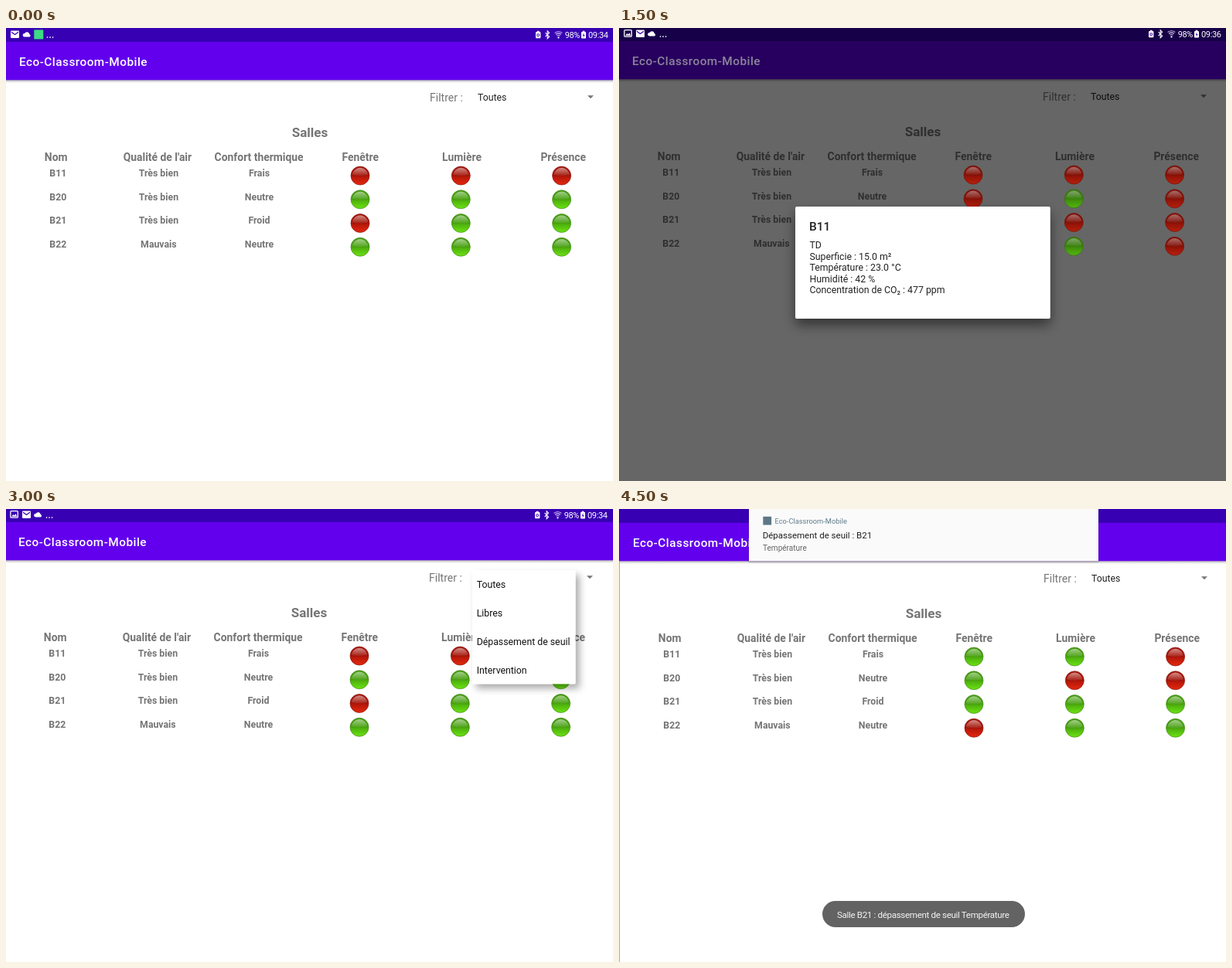
Recreate the animation shown at these times as an HTML page. Size 785 by 586 pixels, loop 6 s.

```html
<!DOCTYPE html>
<html lang="fr">
<head>
<meta charset="utf-8">
<title>Eco-Classroom-Mobile</title>
<style>
html, body { margin: 0; width: 100%; height: 100%; overflow: hidden; background: #fff; }
svg { display: block; width: 785px; height: 586px; }
text { font-family: Roboto, "Noto Sans", sans-serif; white-space: pre; }
</style>
</head>
<body>
<svg id="stage" viewBox="0 0 785 586" xmlns="http://www.w3.org/2000/svg">
  <defs>
    <linearGradient id="R" x2="0" y2="1">
      <stop offset="0" stop-color="#a5160c"/><stop offset=".48" stop-color="#a31307"/>
      <stop offset=".6" stop-color="#bb190a"/><stop offset="1" stop-color="#e4280f"/>
    </linearGradient>
    <linearGradient id="G" x2="0" y2="1">
      <stop offset="0" stop-color="#469c12"/><stop offset=".48" stop-color="#459f0c"/>
      <stop offset=".6" stop-color="#51b60d"/><stop offset="1" stop-color="#6be314"/>
    </linearGradient>
    <linearGradient id="gloss" x2="0" y2="1">
      <stop offset="0" stop-color="#fff" stop-opacity=".5"/>
      <stop offset="1" stop-color="#fff" stop-opacity=".06"/>
    </linearGradient>
    <linearGradient id="fade" x2="0" y2="1">
      <stop offset="0" stop-opacity=".3"/><stop offset="1" stop-opacity="0"/>
    </linearGradient>
    <filter id="deep" x="-20%" y="-30%" width="140%" height="170%">
      <feDropShadow dx="0" dy="8" stdDeviation="8" flood-opacity=".5"/>
    </filter>
    <filter id="side" x="-20%" y="-20%" width="150%" height="150%">
      <feDropShadow dx="5" dy="6" stdDeviation="5" flood-opacity=".33"/>
    </filter>
    <filter id="soft" x="-5%" y="-20%" width="110%" height="150%">
      <feDropShadow dx="0" dy="1" stdDeviation="1" flood-opacity=".4"/>
    </filter>
  </defs>
</svg>
<script>
const STEP = 1500;
const GREY = "#757575";
const stage = document.getElementById("stage");

const rect = (x, y, w, h, fill, extra = "") =>
  `<rect x="${x}" y="${y}" width="${w}" height="${h}" fill="${fill}" ${extra}/>`;
const text = (s, x, y, size, fill, { weight = 400, anchor = "start", gap = 0 } = {}) =>
  `<text x="${x}" y="${y}" font-size="${size}" fill="${fill}" font-weight="${weight}" ` +
  `text-anchor="${anchor}" letter-spacing="${gap}">${s}</text>`;
const at = (x, y, body) => `<g transform="translate(${x} ${y})">${body}</g>`;
const bold = (s, x, y, size) => text(s, x, y, size, GREY, { weight: 700, anchor: "middle" });

// Status bar icons, each drawn from its own left edge
const icons = {
  mail: rect(0, 3.6, 11, 9.4, "#fff", 'rx="1"') +
    '<path d="M1 5.2l4.5 3.3L10 5.2" fill="none" stroke="#3700b3" stroke-width="1.3"/>',
  cloud: '<path d="M2.3 11.5a2.3 2.3 0 0 1 .3-4.6a3.4 3.4 0 0 1 6.2 1a1.9 1.9 0 0 1 0 3.6z" fill="#fff"/>',
  image: rect(0.6, 3.6, 9.4, 8.6, "none", 'rx="1" stroke="#fff" stroke-width="1.3"') +
    '<path d="M2 10.8l2-2.8 1.5 1.6 1.6-2.4 2 3.6z" fill="#fff"/>',
  square: rect(0, 2.4, 12, 12, "#3ddc84"),
};

function statusRight(time) {
  const small = { gap: -0.35 };
  const wifi = [3, 5, 7].map(r =>
    `<path d="M${714.5 - r * 0.7} ${13 - r * 0.95}q${r * 0.7} ${-r * 0.45} ${r * 1.4} 0"/>`).join("");
  return rect(685, 5, 6.4, 8.3, "#fff", 'rx="1"') + rect(686.8, 3.8, 2.8, 1.5, "#fff") +
    '<circle cx="688.2" cy="9.2" r="1.5" fill="none" stroke="#3700b3"/>' +
    '<path d="M697.6 6.2l5 5-2.4 2.4V3.9l2.4 2.3-5 5" fill="none" stroke="#fff" stroke-width="1.1"/>' +
    `<g fill="none" stroke="#d8ccf2" stroke-width="1.1">${wifi}</g>` +
    '<circle cx="714.5" cy="12.4" r="1.1" fill="#fff"/>' +
    text("98%", 722.7, 13, 11, "#fff", { gap: -0.4 }) +
    rect(744, 5, 6, 8.6, "#fff", 'rx=".8"') + rect(745.7, 3.7, 2.6, 1.5, "#fff") +
    '<path d="M747.6 6.3l-2 3.4h1.5l-.5 2.7 2-3.5h-1.4z" fill="#3700b3"/>' +
    text(time, 753, 13, 11, "#fff", small);
}

function status(left, time) {
  const dots = [53.5, 57, 60.5].map(x => rect(x - 0.7, 11.3, 1.5, 1.5, "#fff")).join("");
  return left.map(([name, x]) => at(x, 0, icons[name])).join("") + dots + statusRight(time);
}

const ball = (kind, x, y) => at(x, y,
  `<circle r="12" fill="url(#${kind})" stroke="${kind === "R" ? "#8c1a12" : "#478a1c"}" stroke-width=".7"/>` +
  '<path d="M-10.3 -1.2A10.4 10.4 0 0 1 10.3 -1.2Q0 1.2 -10.3 -1.2z" fill="url(#gloss)"/>');

const columns = ["Nom", "Qualité de l'air", "Confort thermique", "Fenêtre", "Lumière", "Présence"];
const rooms = [
  ["B11", "Très bien", "Frais"],
  ["B20", "Très bien", "Neutre"],
  ["B21", "Très bien", "Froid"],
  ["B22", "Mauvais", "Neutre"],
];
const rowY = i => i * 30.75;

const balls = lights => lights.split(" ").map((row, i) =>
  [...row].map((kind, j) => ball(kind, 458 + j * 130.3, 191 + rowY(i))).join("")).join("");

const title = fill => text("Eco-Classroom-Mobile", 17, 49, 15.4, fill, { weight: 500, gap: 0.46 });

const base = rect(-5, -5, 800, 600, "#fff") +
  rect(-5, 67, 800, 4, "url(#fade)") +
  rect(-5, 18, 800, 49.3, "#6200ee") +
  rect(-5, -5, 800, 23, "#3700b3") +
  text("Filtrer :", 548, 94.8, 14, GREY) +
  text("Toutes", 610, 94, 12.3, "#212121") +
  '<path d="M752 87.3h8l-4 4z" fill="#757575"/>' +
  bold("Salles", 393, 140.6, 17) +
  columns.map((s, i) => bold(s, 64.7 + i * 131.2, 172, 13.9)).join("") +
  rooms.map((room, i) => room.map((s, j) =>
    bold(s, 67.3 + j * 130.1, 191.9 + rowY(i), 12.3)).join("")).join("");

const screen = lights => base + title("#fff") + balls(lights);

const dimmed = lights => base + rect(-5, -5, 800, 600, "#000", 'opacity=".6"') +
  title("#8d859a") + `<g style="filter:brightness(.8)">${balls(lights)}</g>`;

const dialog = rect(228, 231, 329.7, 145, "#fff", 'rx="2" filter="url(#deep)"') +
  text("B11", 246, 261.6, 15.4, "#212121", { weight: 500 }) +
  ["TD", "Superficie : 15.0 m²", "Température : 23.0 °C", "Humidité : 42 %",
    "Concentration de CO₂ : 477 ppm"]
    .map((s, i) => text(s, 246.5, 285.2 + i * 14.55, 12.3, "#222")).join("");

const menu = rect(603, 79, 133.5, 147.3, "#fff", 'rx="1.5" filter="url(#side)"') +
  ["Toutes", "Libres", "Dépassement de seuil", "Intervention"]
    .map((s, i) => text(s, 608.7, 102 + i * 36.9, 12.3, "#111")).join("");

const alerts = rect(0, 68, 1, 518, "#aaa") +
  rect(168, -4, 452, 71.3, "#fafafa", 'filter="url(#soft)"') +
  rect(186.3, 9.8, 10.8, 10.8, "#5c7886") +
  text("Eco-Classroom-Mobile", 201.5, 18.9, 9.3, "#607d8b") +
  text("Dépassement de seuil : B21", 185.7, 38.3, 11.5, "#212121") +
  text("Température", 186, 54.1, 10.05, "#666") +
  rect(263, 507, 262, 34, "#636363", 'rx="17"') +
  text("Salle B21 : dépassement de seuil Température", 282, 528.8, 11.6, "#f4f4f4", { gap: -0.34 });

const late = [["image", 6.3], ["mail", 22], ["cloud", 37]];
const early = [["mail", 6], ["cloud", 21.5], ["square", 36.3]];
const calm = "RRR GGG RGG GGG";

const scenes = [
  screen(calm) + status(early, "09:34"),
  at(0, -1, dimmed("RRR RGR RRR GGR") + status(late, "09:36")) + dialog,
  at(-1, -1, screen(calm) + status(late, "09:34")) + menu,
  at(1, 0, screen("GGR GRR GGG RGG")) + alerts,
];

stage.insertAdjacentHTML("beforeend",
  scenes.map(s => `<g class="scene" display="none">${s}</g>`).join(""));
const groups = [...stage.querySelectorAll(".scene")];

function draw(ms) {
  const now = Math.floor(ms / STEP) % groups.length;
  groups.forEach((g, i) => g.setAttribute("display", i === now ? "inline" : "none"));
}

function tick() {
  draw(performance.now());
  requestAnimationFrame(tick);
}
tick();
</script>
</body>
</html>
```
